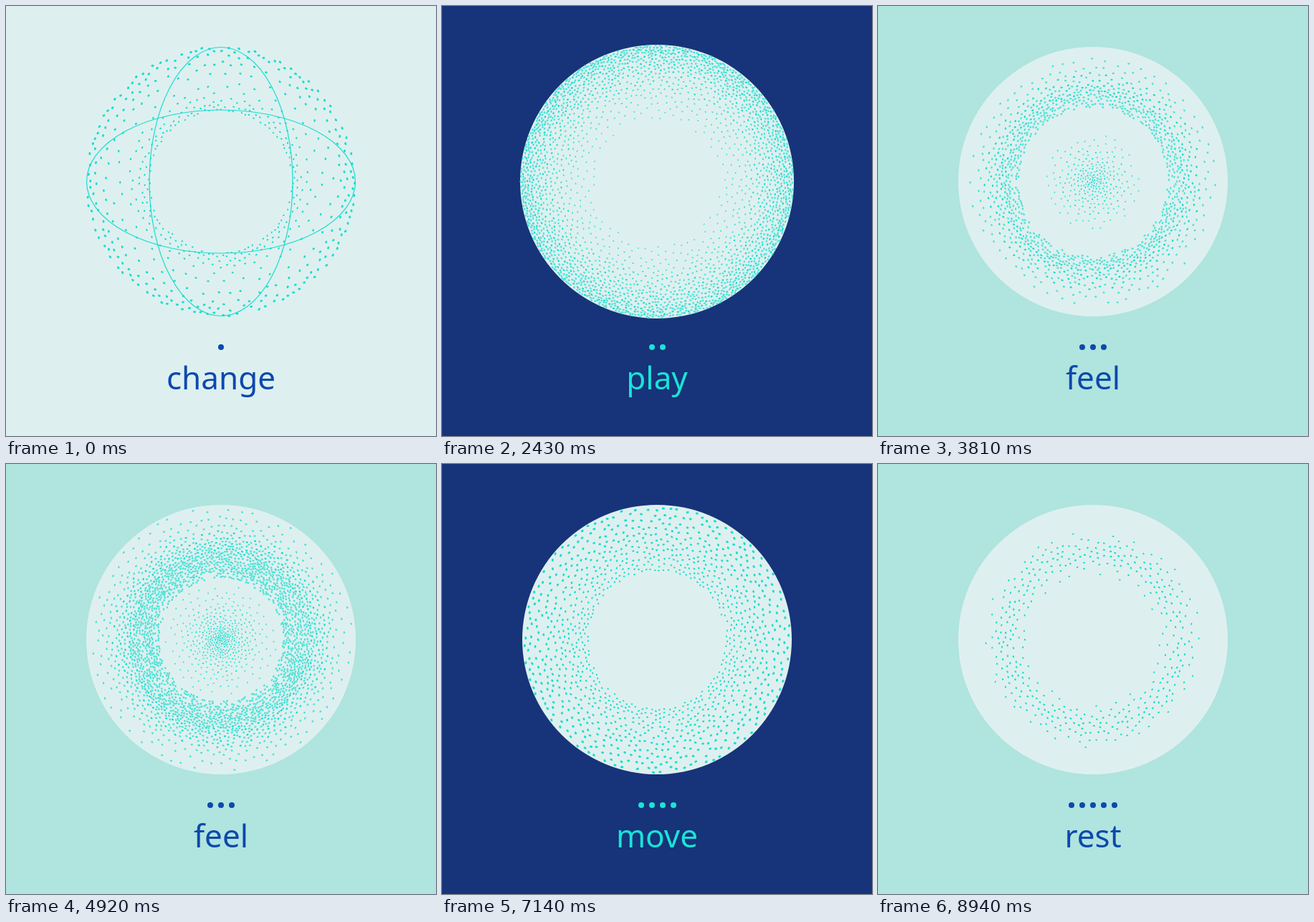
Recreate the animation shown at these times as an HTML page with a canvas. Size 600 px wide and 600 px high, loop 8.97 s.

```html
<!DOCTYPE html>
<html lang="en">
<head>
<meta charset="utf-8">
<title>change, play, feel, move, rest</title>
<style>
  html, body { margin: 0; width: 100%; height: 100%; overflow: hidden; }
  canvas, svg { position: absolute; left: 0; top: 0; width: 600px; height: 600px; }
  text { font: 500 44px "Noto Sans", sans-serif; text-anchor: middle; }
</style>
</head>
<body>
<canvas id="stage" width="600" height="600"></canvas>
<svg viewBox="0 0 600 600"><text id="word" x="300" y="535"></text></svg>
<script>
const LOOP = 8970, SCENE = 1800, HALF = 900;
const STEPS = [120, 210, 330, 420, 510, 630, 720, 840];
const CX = 300, CY = 245, R = 188, CELL = 8, COLS = 75;
const TEAL = '#1adccf', PALE = '#ddf0ef', NAVY = '#17337a', MINT = '#b0e4de', BLUE = '#0d48ad';

const ctx = document.getElementById('stage').getContext('2d');
const word = document.getElementById('word');

// spacing(r, k): distance between stipples at radius r in step k; 0 means empty
const scenes = [
  { word: 'change', bg: PALE, ink: BLUE, rings: true, range: [99, 188], growth: 1,
    spacing(r) {
      const t = (r - 99) / 89;
      return 4.8 + 2.4 * t + 9 * Math.sin(Math.PI * t) ** 2;
    },
    size: r => 1.2 + 0.6 * (r - 99) / 89 },
  { word: 'play', bg: NAVY, ink: '#1be3d6', swell: 0.5, range: [75, 192], growth: 0.7,
    spacing: (r, k) => r < 130 - 7 * k || r > 187.5 + k / 2 ? 0 : 5.6 * Math.exp((190 - r) / 72),
    size: r => 0.95 + 0.55 * (r - 75) / 117 },
  { word: 'feel', bg: MINT, ink: BLUE, range: [0, 184], growth: 0.8,
    spacing(r, k) {
      if (r < Math.min(50 + 8 * k, 78)) return 3.5 * Math.exp(r / 42);
      if (r < Math.max(122 - 9 * k, 86) || r > 152 + 10 * k) return 0;
      return 5 * Math.exp(Math.max(0, r - 122) / 36);
    },
    size: r => r < 80 ? 1.1 : 1.45 },
  { word: 'move', bg: NAVY, ink: '#1be3d6', range: [96, 186], growth: 0.45,
    spacing: r => 4.8 + 3 * (r - 96) / 90,
    size: r => 1.2 + 0.65 * (r - 96) / 90 },
  { word: 'rest', bg: MINT, ink: BLUE, range: [55, 186], growth: 0.8,
    spacing(r, k) {
      const d = Math.abs(r - 121) / (30 + 4 * k);
      return d > 1 ? 0 : 6 * Math.exp(d * d);
    },
    size: r => 1.4 - Math.abs(r - 121) / 150 }
];

function seeded(seed) {
  return () => {
    seed = (seed + 0x6d2b79f5) | 0;
    let v = Math.imul(seed ^ (seed >>> 15), 1 | seed);
    v ^= v + Math.imul(v ^ (v >>> 7), 61 | v);
    return ((v ^ (v >>> 14)) >>> 0) / 4294967296;
  };
}

// Dart throwing, step by step with tighter spacing, so each step adds to the last.
function stipple(scene, seed) {
  const random = seeded(seed), dots = [];
  const grid = Array.from({ length: COLS * COLS }, () => []);
  const [inner, outer] = scene.range;

  function isFree(x, y, gap) {
    const x0 = Math.floor((x - gap) / CELL), x1 = Math.floor((x + gap) / CELL);
    const y0 = Math.floor((y - gap) / CELL), y1 = Math.floor((y + gap) / CELL);
    for (let j = y0; j <= y1; j++)
      for (let i = x0; i <= x1; i++)
        for (const dot of grid[j * COLS + i])
          if ((dot.x - x) ** 2 + (dot.y - y) ** 2 < gap * gap) return false;
    return true;
  }

  for (let k = 0; k <= STEPS.length; k++) {
    for (let n = 0; n < 8000; n++) {
      const r = inner + (outer - inner) * random(), a = 2 * Math.PI * random();
      const gap = scene.spacing(r, k) / Math.sqrt(1 + scene.growth * k);
      const x = CX + r * Math.cos(a), y = CY + r * Math.sin(a);
      if (!gap || !isFree(x, y, gap)) continue;
      const dot = { x, y, birth: k, size: scene.size(r), tilt: a + 1.57 + random() - 0.5 };
      dots.push(dot);
      grid[Math.floor(y / CELL) * COLS + Math.floor(x / CELL)].push(dot);
    }
  }
  return dots;
}

function disc(x, y, r, color) {
  ctx.fillStyle = color;
  ctx.beginPath();
  ctx.arc(x, y, r, 0, 2 * Math.PI);
  ctx.fill();
}

function drawDots(dots, alpha) {
  ctx.globalAlpha = alpha;
  ctx.fillStyle = TEAL;
  ctx.beginPath();
  for (const { x, y, size, tilt } of dots) {
    ctx.moveTo(x + 1.15 * size * Math.cos(tilt), y + 1.15 * size * Math.sin(tilt));
    ctx.ellipse(x, y, 1.15 * size, 0.85 * size, tilt, 0, 2 * Math.PI);
  }
  ctx.fill();
  ctx.globalAlpha = 1;
}

function drawRing(rx, ry) {
  ctx.strokeStyle = TEAL;
  ctx.lineWidth = 1.2;
  ctx.beginPath();
  ctx.ellipse(CX, CY, rx, ry, 0, 0, 2 * Math.PI);
  ctx.stroke();
}

function draw(index, k) {
  const scene = scenes[index];
  ctx.fillStyle = scene.bg;
  ctx.fillRect(0, 0, 600, 600);
  disc(CX, CY, R + (scene.swell || 0) * k, PALE);
  drawDots(scene.dots.filter(d => d.birth > 0 && d.birth <= k), 0.72);
  drawDots(scene.dots.filter(d => d.birth === 0), 1);
  if (scene.rings) {
    drawRing(187.5, 100);
    drawRing(100, 187.5);
  }
  for (let i = 0; i <= index; i++)
    disc(300 + (index % 2 ? 0.5 : 0) + 15 * (i - index / 2), 476, 4, scene.ink);
  word.textContent = scene.word;
  word.style.fill = scene.ink;
}

scenes.forEach((scene, i) => { scene.dots = stipple(scene, 11 + 7 * i); });

let shown = '';
function tick() {
  const t = performance.now() % LOOP;
  const index = Math.floor(t / SCENE), u = t % SCENE;
  const passed = STEPS.filter(s => s <= u % HALF).length;
  const k = u < HALF ? passed : STEPS.length - passed;
  const key = index + ':' + k;
  if (key !== shown) draw(index, k);
  shown = key;
  requestAnimationFrame(tick);
}
tick();
</script>
</body>
</html>
```
